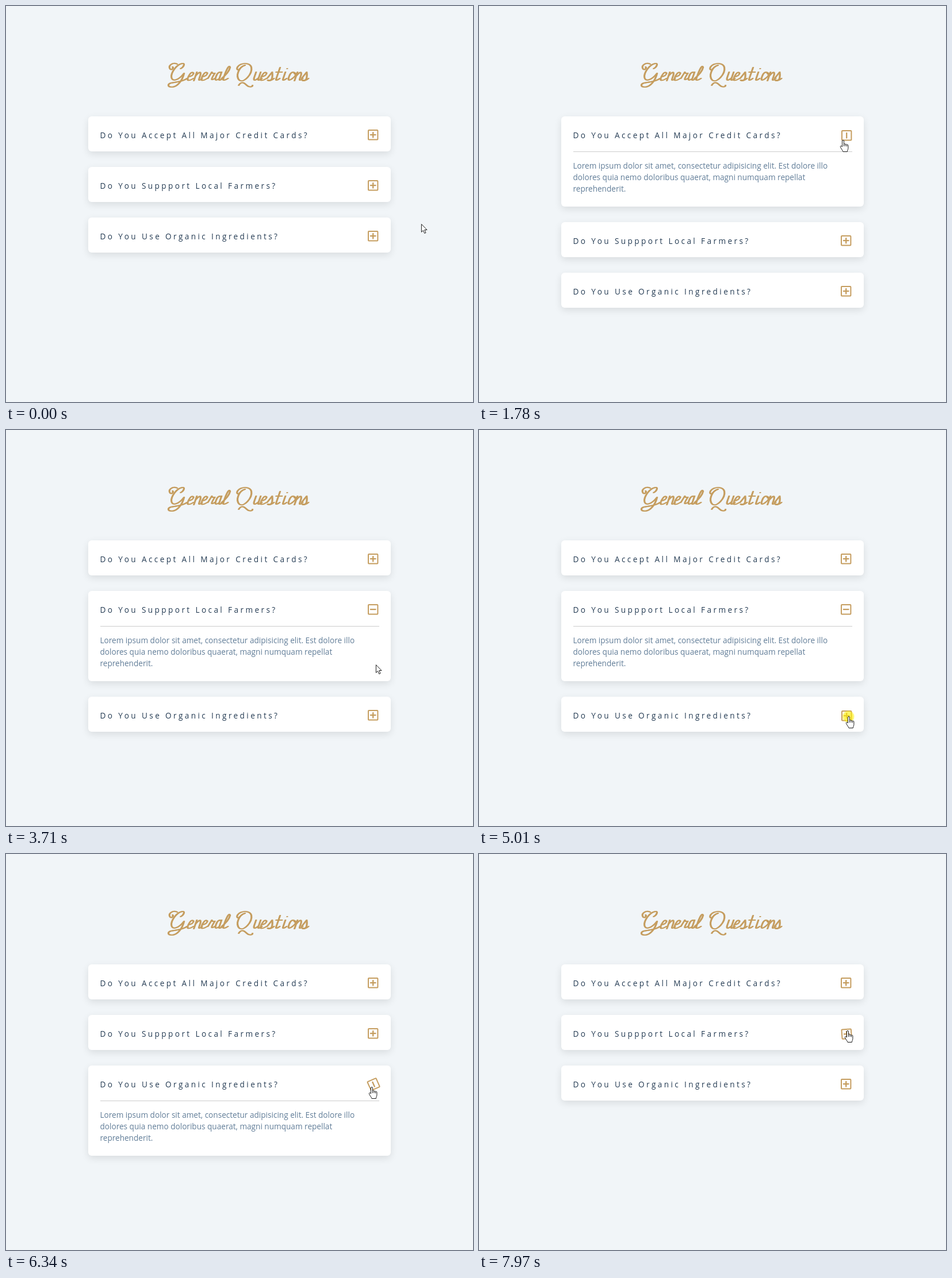
These frames come from a looping animation (812 by 689 pixels, 8000 ms). An HTML page:

```html
<!DOCTYPE html>
<html lang="en">
<head>
<meta charset="utf-8">
<title>General Questions</title>
<style>
  html, body { margin: 0; width: 100%; height: 100%; overflow: hidden; background: #f1f5f8; }
  body { position: relative; font: 13.6px/20.4px "Open Sans", sans-serif; }
  svg { position: absolute; left: 0; top: 0; overflow: visible; }
  .script { fill: none; stroke: #c59d5f; stroke-width: 1.9; stroke-linecap: round; stroke-linejoin: round; }
  .card {
    position: absolute; left: 143px; width: 526px; height: 61px;
    border-radius: 6px; background: #fff; box-shadow: 0 4.25px 12.75px rgba(0, 0, 0, .1);
  }
  .card.open { height: 157px; }
  p { position: absolute; margin: 0; white-space: nowrap; }
  .question { left: 20.5px; top: 23px; color: #243b53; letter-spacing: 3.4px; }
  .answer {
    left: 20.5px; top: 61px; width: 485px; padding-top: 13.6px;
    border-top: 1px solid #ccc; color: #617d98; visibility: hidden;
  }
  .open .answer { visibility: visible; }
  .icon { left: 485.6px; top: 23.4px; width: 18.4px; height: 18.4px; transform-origin: 9.2px 10.2px; }
  .open .upright { display: none; }
  .pointer { fill: #fff; stroke: #111; stroke-width: .95; stroke-linejoin: round; }
</style>
</head>
<body>
<svg width="812" height="180" role="img" aria-label="General Questions">
  <defs><g id="title"></g></defs>
  <g class="script"><use href="#title"/><use href="#title" x="1.3"/></g>
</svg>
<main></main>
<svg width="812" height="689">
  <defs>
    <radialGradient id="glow">
      <stop offset=".75" stop-color="#fff000" stop-opacity=".62"/>
      <stop offset="1" stop-color="#fff000" stop-opacity=".3"/>
    </radialGradient>
  </defs>
  <g id="cursor">
    <circle id="click" cx="-.7" cy=".7" r="10.5" fill="url(#glow)"/>
    <path id="arrow" class="pointer" d="M.4.6V14.3L3.5 11.4 5.7 16.5 8 15.5 5.8 10.5H10Z"/>
    <g id="hand" class="pointer">
      <path d="M-1.5 12V2a1.5 1.5 0 0 1 3 0V7.5a1.4 1.4 0 0 1 2.6.4 1.4 1.4 0 0 1 2.5.8
        1.3 1.3 0 0 1 2.3 1V14.5C8.7 17 7.5 18 7.3 20.5H0C-.6 18-4.5 14.2-4.7 11.5-4.4 9.8-2.4 10.3-1.5 12Z"/>
      <path fill="none" d="M1.5 7.5V11M4.1 8V11M6.6 8.8V11.4"/>
    </g>
  </g>
</svg>
<script>
const LOOP = 8000, TURN = 300;
const byId = id => document.getElementById(id);

// Script lettering: small letters share a few upright parts and are slanted together.
const stem = x => `M${x}-15V-4Q${x} 2 ${x + 6}-4`;
const bowl = "M8-14Q1-17 1-7T8-4";
const letters = {
  e: "M1-7Q9-8 8-13Q3-18 1-7Q0 4 11-4",
  n: "M1 0V-15M1-8Q7-20 9-10V-4Q9 2 14-4",
  r: "M0-4L3-15Q4-12 9-13Q4 3 12-4",
  a: bowl + stem(8),
  l: "M0-4Q9-14 8-23Q4-30 3-12V-4Q3 2 11-4",
  u: "M1-15V-5Q2 3 9-5" + stem(9),
  s: "M0-4L5-15Q13 2 2-1Q6 2 12-4",
  t: "M0-15H10M4-23V-15" + stem(4),
  i: "M5-21h.1" + stem(4),
  o: bowl + "T8-14Q9-10 13-13"
};
const capitals = {
  G: "M22-21C28-24 30-31 25-30C16-29 5-15 6-6C7 2 18 0 28-13C25 0 16 11 7 11C-1 11-1 6 5 4C15 2 26 2 33-4M16-29C7-33-1-25 4-20C7-18 10-22 8-24",
  Q: "M15-27C4-24-2-8 5-1C13 5 28-12 26-23C24-32 8-32 2-24C-1-19 4-17 6-21M4 8C9 0 14 4 18 8C22 12 28 11 28 8"
};
function script(word, x, indent) {
  const rest = [...word.slice(1)].map((letter, i) =>
    `<path transform="translate(${x + indent + i * 12} 130) skewX(-19)" d="${letters[letter]}"/>`);
  return `<path transform="translate(${x} 130)" d="${capitals[word[0]]}"/>` + rest.join("");
}
byId("title").innerHTML = script("General", 281, 32) + script("Questions", 400, 28);

const questions = [
  "Do You Accept All Major Credit Cards?",
  "Do You Suppport Local Farmers?",
  "Do You Use Organic Ingredients?"
];
document.querySelector("main").innerHTML = questions.map(text => `
  <section class="card">
    <p class="question">${text}</p>
    <p class="answer">Lorem ipsum dolor sit amet, consectetur adipisicing elit. Est dolore illo<br>
      dolores quia nemo doloribus quaerat, magni numquam repellat<br>reprehenderit.</p>
    <svg class="icon" viewBox="0 0 448 448" fill="#c59d5f">
      <rect x="24" y="24" width="400" height="400" rx="24" fill="none" stroke="#c59d5f" stroke-width="48"/>
      <rect x="96" y="196" width="256" height="56" rx="12"/>
      <rect class="upright" x="196" y="96" width="56" height="256" rx="12"/>
    </svg>
  </section>`).join("");
const cards = [...document.querySelectorAll(".card")];
const icons = [...document.querySelectorAll(".icon")];

const home = { x: 722, y: 379 };
const moves = [
  { from: 0, to: 800, x: 633, y: 225 },
  { from: 1540, to: 2900, x: 643, y: 408 },
  { from: 4040, to: 4760, x: 643, y: 498 },
  { from: 5420, to: 6480, x: 636, y: 403 },
  { from: 7270, to: 7970, x: 641, y: 307 }
];
const clicks = [
  { card: 0, press: 1040, release: 1240 },
  { card: 1, press: 3230, release: 3360 },
  { card: 2, press: 5010, release: 5140 },
  { card: 2, press: 6610, release: 6740 }
];

const clamp = v => Math.min(1, Math.max(0, v));
const glide = v => v ** 3 * (10 - 15 * v + 6 * v * v);
const settle = v => 1 - (1 - v) ** 2.2;

function cursorAt(t) {
  return moves.reduce((at, move) => {
    const k = glide(clamp((t - move.from) / (move.to - move.from)));
    return { x: at.x + (move.x - at.x) * k, y: at.y + (move.y - at.y) * k };
  }, home);
}

// A click opens its card and closes the others; clicking an open card closes it.
function openCard(t) {
  return clicks.filter(c => c.release <= t)
    .reduce((open, { card }) => open === card ? -1 : card, -1);
}

function topOf(card, open) {
  return 192 + card * 88 + (open >= 0 && open < card ? 96 : 0);
}

function hovered(t) {
  const { x, y } = cursorAt(t), open = openCard(t);
  return cards.findIndex((_, i) => Math.hypot(0, x - 638) < 13 && Math.abs(y - topOf(i, open) - 33) < 13);
}

// Every moment the cursor enters or leaves an icon
const turns = cards.map(() => []);
for (let t = 0, last = -1; t < LOOP; t += 5) {
  const current = hovered(t);
  if (current === last) continue;
  if (last >= 0) turns[last].push({ at: t, by: -90 });
  if (current >= 0) turns[current].push({ at: t, by: 90 });
  last = current;
}

function angle(card, t) {
  return turns[card].reduce((sum, { at, by }) => sum + by * settle(clamp((t - at) / TURN)), 0);
}

function show(id, visible) {
  byId(id).style.display = visible ? "" : "none";
}

function draw(t) {
  const open = openCard(t);
  cards.forEach((card, i) => {
    card.classList.toggle("open", open === i);
    card.style.top = topOf(i, open) + "px";
    icons[i].style.transform = `rotate(${angle(i, t)}deg)`;
  });
  const over = hovered(t) >= 0;
  show("hand", over);
  show("arrow", !over);
  show("click", clicks.some(c => t >= c.press && t < c.release));
  const { x, y } = cursorAt(t);
  byId("cursor").setAttribute("transform", `translate(${Math.round(x)} ${Math.round(y)})`);
}

const began = performance.now();
(function tick() {
  draw((performance.now() - began) % LOOP);
  requestAnimationFrame(tick);
})();
</script>
</body>
</html>
```
